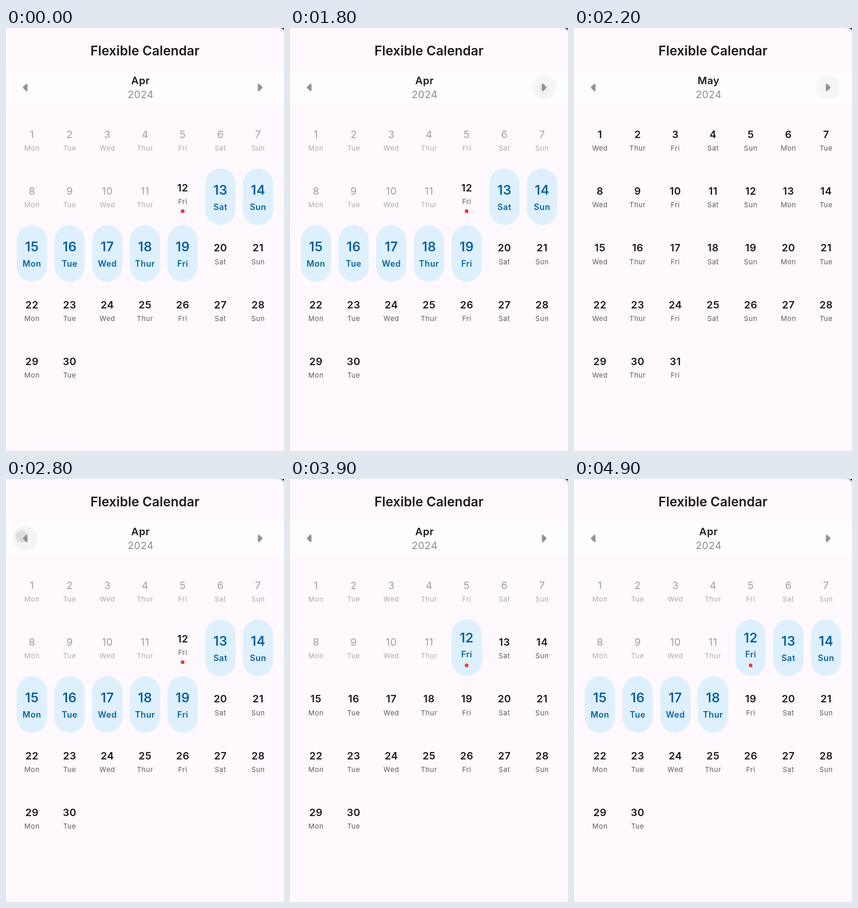
An HTML page for the animation above (5 s loop, 600 px wide and 911 px high).

```html
<!DOCTYPE html>
<html lang="en">
<head>
<meta charset="utf-8">
<title>Flexible Calendar</title>
<style>
  html, body { margin: 0; width: 100%; height: 100%; overflow: hidden; background: #fff9fe; }
  svg { display: block; width: 100%; height: 100%; }
  text { font-family: Inter, "Open Sans", sans-serif; text-anchor: middle; fill: #1c1a1e; }
  .title { font-size: 28px; font-weight: 600; letter-spacing: .1px; }
  .month { font-size: 22px; font-weight: 600; letter-spacing: .6px; }
  .year { font-size: 22px; letter-spacing: .3px; fill: #8f8c90; }
  .num { font-size: 22px; font-weight: 600; letter-spacing: .5px; }
  .name { font-size: 15px; letter-spacing: .6px; fill: #5d5a5e; }
  .past .num { font-weight: 400; fill: #a19ea2; }
  .past .name { fill: #aca9ad; }
  .on text { fill: #04639f; }
  .on .num { font-size: 28px; }
  .on .name { font-size: 18px; font-weight: 600; }
  .pill { fill: #def0fd; }
  .dot { fill: #f03a30; }
  .arrow { fill: #969397; stroke: #969397; stroke-width: 4; stroke-linejoin: round; }
</style>
</head>
<body>
<svg viewBox="0 0 600 911">
  <defs>
    <filter id="soft" x="-100%" y="-100%" width="300%" height="300%"><feGaussianBlur stdDeviation="2.5"/></filter>
    <clipPath id="cell"><rect id="cellBox" width="81.35" height="122.2"/></clipPath>
  </defs>
  <rect width="600" height="911" fill="#fff9fe"/>
  <path d="M589-2Q598 1 602 10V-2Z" fill="#000" opacity=".4" filter="url(#soft)"/>
  <path d="M593 0Q597 1 600 4V0Z" fill="#3a383b"/>
  <rect y="92" width="600" height="72" fill="#fffdff"/>
  <text class="title" x="300" y="59">Flexible Calendar</text>
  <text class="month" id="month" x="290.5" y="121"></text>
  <text class="year" x="290.5" y="151">2024</text>
  <circle id="hoverL" cx="41.5" cy="128" r="26.5"/>
  <circle id="hoverR" cx="548.5" cy="128" r="26.5"/>
  <circle id="splash"/>
  <path class="arrow" d="M38.5 128L44.5 122V134Z"/>
  <path class="arrow" d="M551.5 128L545.5 122V134Z"/>
  <g clip-path="url(#cell)"><circle id="tap"/></g>
  <g id="grid"></g>
</svg>
<script>
const LOOP = 5000, STEP = 100, TODAY = 12;
const COL = 81.35, ROW = 122.2, LEFT = 56, TOP = 180.2;
const WEEK = ['Mon', 'Tue', 'Wed', 'Thur', 'Fri', 'Sat', 'Sun'];
const APR = { name: 'Apr', days: 30, first: 0 };
const MAY = { name: 'May', days: 31, first: 2 };
const $ = id => document.getElementById(id);
const clamp = v => Math.max(0, Math.min(1, v));
const mix = (a, b, p) => a + (b - a) * p;

function set(id, attrs) {
  for (const k in attrs) $(id).setAttribute(k, attrs[k]);
}

function dayCell(month, day, from, to) {
  const x = LEFT + (day - 1) % 7 * COL;
  const y = TOP + Math.floor((day - 1) / 7) * ROW;
  const april = month === APR;
  const on = april && day >= from && day <= to;
  const today = april && day === TODAY;
  const lift = today ? 7.7 : 0;
  const kind = on ? 'on' : april && day < TODAY ? 'past' : '';
  const pill = `<rect class="pill" x="${x - 32.8}" y="${y + .2}" width="65.6" height="121.8" rx="32.8"/>`;
  const dot = `<circle class="dot" cx="${x - .2}" cy="${y + (on ? 99.2 : 92.2)}" r="4"/>`;
  return `<g class="${kind}">${on ? pill : ''}
    <text class="num" x="${x}" y="${y + 56.8 - lift}">${day}</text>
    <text class="name" x="${x}" y="${y + (on ? 89.6 : 84) - lift}">${WEEK[(month.first + day - 1) % 7]}</text>
    ${today ? dot : ''}</g>`;
}

let shown = '';
function showMonth(month, from, to) {
  const key = [month.name, from, to].join();
  if (key === shown) return;
  shown = key;
  $('month').textContent = month.name;
  let cells = '';
  for (let day = 1; day <= month.days; day++) cells += dayCell(month, day, from, to);
  $('grid').innerHTML = cells;
}

// Ink splash: grows from the tap towards the button centre and fades.
function splash(t) {
  const right = t < 2500;
  const p = clamp((t - (right ? 1900 : 2800)) / 300);
  const live = t >= 1800 && t < 2200 || t >= 2800 && t < 3200;
  set('splash', {
    cx: right ? 548.5 : mix(34, 41.5, p),
    cy: right ? mix(131, 128, p) : mix(124, 128, p),
    r: right && t < 1900 ? 12 : mix(13, 26.5, p),
    opacity: !live ? 0 : right && t < 1900 ? .035 : .09 * (1 - p)
  });
}

function tap(t) {
  const second = t >= 4900;
  const p = clamp((t - (second ? 4900 : 3900)) / 400);
  const day = second ? 18 : TODAY;
  set('cellBox', {
    x: LEFT + (day - 1) % 7 * COL - COL / 2,
    y: TOP + Math.floor((day - 1) / 7) * ROW
  });
  set('tap', {
    cx: second ? 283 : 398, cy: second ? 479 : 382,
    r: mix(22, 60, p), opacity: t < 3900 ? 0 : .025 * (1 - p)
  });
}

function draw(time) {
  const t = Math.floor(time % LOOP / STEP) * STEP;
  if (t >= 1900 && t < 2800) showMonth(MAY, 0, 0);
  else if (t < 3900) showMonth(APR, 13, 19);
  else if (t < 4900) showMonth(APR, 12, 12);
  else showMonth(APR, 12, 18);
  set('hoverR', { opacity: t >= 1800 && t < 2800 ? .03 : 0 });
  set('hoverL', { opacity: t >= 2800 ? .04 * clamp((3300 - t) / 300) : 0 });
  splash(t);
  tap(t);
}

const start = performance.now();
function tick() {
  draw(performance.now() - start);
  requestAnimationFrame(tick);
}
tick();
</script>
</body>
</html>
```
